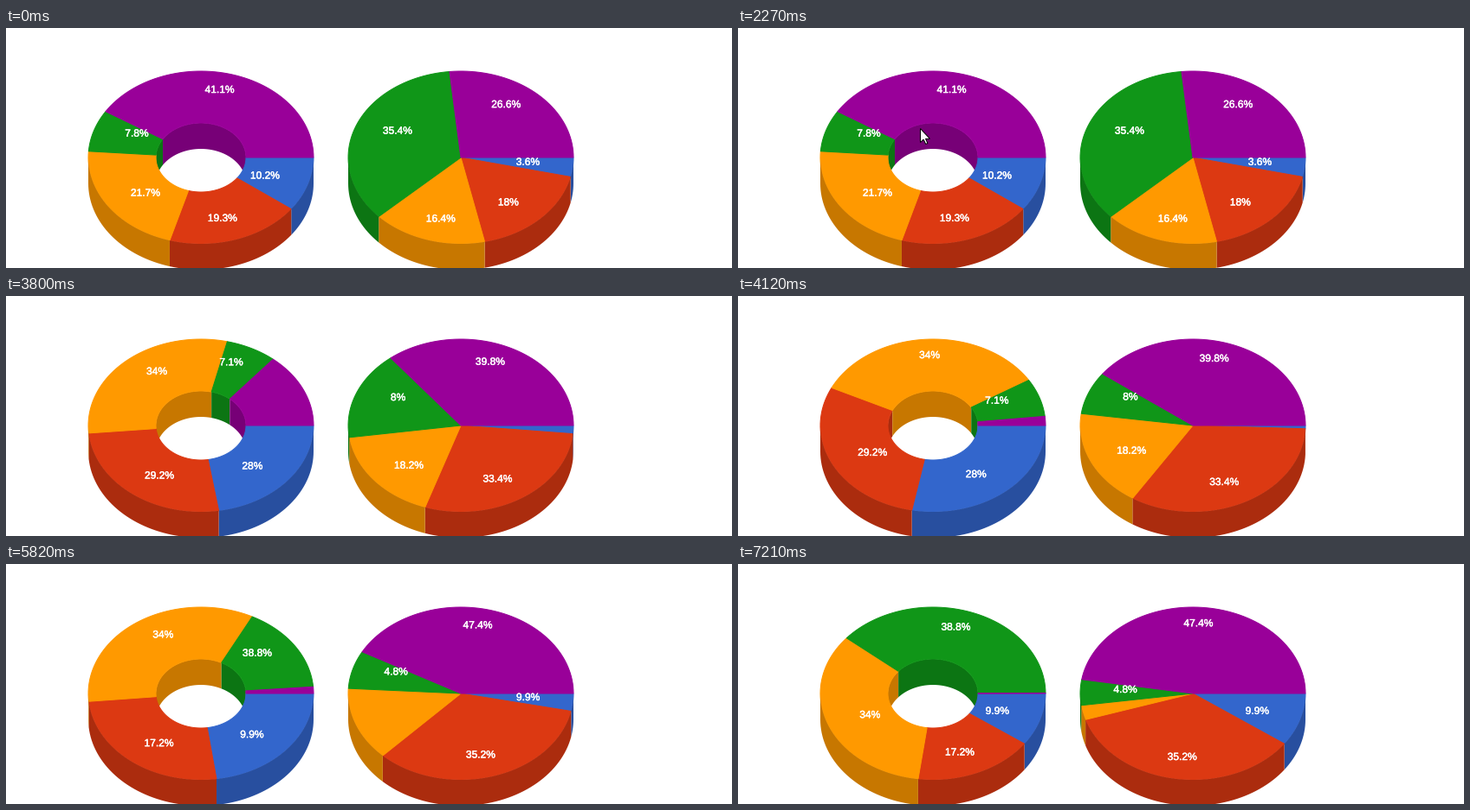
A matplotlib script that plays this animation: 838x278 px, repeating every 7600 ms.

```python
import numpy as np
import matplotlib.pyplot as plt
from matplotlib.animation import FuncAnimation
from matplotlib.colors import to_rgb
from matplotlib.patches import Polygon
import matplotlib.patheffects as pe

W, H, DPI = 838, 278, 64
LOOP, TICK = 7600, 20
PX = 72 / DPI  # points per pixel

COLORS = ["#3366CC", "#DC3912", "#FF9900", "#109618", "#990099"]
RX, RY, DEPTH, LABEL_R = 130, 100, 30, 78
MIN_LABEL = 3.18  # smallest share in percent that gets a label

DONUT = [
    [10.2, 19.3, 21.7, 7.8, 41.1],
    [28, 29.2, 34, 7.1, 1.7],
    [9.9, 17.2, 34, 38.8, 0.1],
]
PIE = [
    [3.6, 18, 16.4, 35.4, 26.6],
    [0.6, 33.4, 18.2, 8, 39.8],
    [9.9, 35.2, 2.7, 4.8, 47.4],
]


def ticks(first, last, count):
    """Redraw times of a burst of motion, on a 10 ms grid."""
    return [(first + (last - first) * k // (count - 1)) // 10 * 10
            for k in range(count)]


# (click time, redraw times) of each change of data
CHANGES = [(3370, ticks(3420, 4120, 10)), (5508, ticks(5520, 6280, 11))]
DURATION = 750

# (redraw times, waypoints, pointer stays afterwards)
MOVES = [
    (ticks(70, 790, 10),
     [(619, 224), (470, 158), (317, 115), (262, 110), (230, 118), (218, 126)],
     True),
    (ticks(1020, 1720, 10),
     [(212, 118), (190, 102), (177, 86), (196, 76), (226, 88), (240, 106)],
     True),
    (ticks(2270, 2890, 9),
     [(210, 116), (178, 148), (126, 196), (80, 238), (50, 280)],
     False),
    (ticks(6680, 7210, 8),
     [(209, 268), (350, 252), (527, 243), (690, 255), (830, 274)],
     False),
]
ARROW = np.array([(0, 0), (0, 16), (3.6, 12.6), (6.2, 18), (8.4, 17),
                  (6, 11.8), (11, 11.8)]) + 0.5


def ease(u):
    u = min(max(u, 0), 1)
    return 4 * u ** 3 if u < 0.5 else 1 - 4 * (1 - u) ** 3


def shares_at(t):
    """Index of the current data set and progress towards it."""
    for i in (1, 0):
        start, times = CHANGES[i]
        if t >= times[0]:
            now = max(x for x in times if x <= t)
            return i + 1, ease((now - start) / DURATION)
    return 0, 1


def pointer_at(t):
    for times, points, stays in reversed(MOVES):
        if t < times[0]:
            continue
        if t >= times[-1] and not stays:
            return None
        k = sum(x <= t for x in times) - 1
        u = k / (len(times) - 1)
        grid = np.linspace(0, 1, len(points))
        xs, ys = zip(*points)
        return np.interp(u, grid, xs), np.interp(u, grid, ys)
    return None


def arc(a, b, scale=1, dy=0):
    n = max(3, int(abs(b - a) * 25) + 3)
    v = np.linspace(a, b, n)
    return np.column_stack([RX * scale * np.cos(v),
                            RY * scale * np.sin(v) + dy])


def wall(a, b, scale):
    return np.vstack([arc(a, b, scale), arc(b, a, scale, DEPTH)])


class Pie3D:
    def __init__(self, ax, cx, cy, hole, data):
        self.center = np.array([cx, cy])
        self.hole = hole
        self.data = data
        dark = [tuple(0.7 ** 0.7 * v for v in to_rgb(c)) for c in COLORS]

        def layer(colors, z, **style):
            return [ax.add_patch(Polygon([(0, 0)] * 3, fc=c, zorder=z,
                                         **(style or {"lw": 0}),
                                         **({"ec": c} if style else {})))
                    for c in colors]

        self.inner = layer(dark, 1)
        self.top = layer(COLORS, 2, lw=PX, joinstyle="bevel")
        self.outer = layer(dark, 3)
        self.labels = [
            ax.text(0, 0, "", color="white", family="Liberation Sans",
                    size=12 * PX, ha="center", va="baseline", zorder=4,
                    path_effects=[pe.withStroke(linewidth=0.4 * PX,
                                                foreground="white")])
            for _ in COLORS]

    def update(self, step, p):
        new = np.array(self.data[step], float)
        old = np.array(self.data[max(step - 1, 0)], float)
        mix = old / old.sum() * (1 - p) + new / new.sum() * p
        ends = np.cumsum(mix) * 2 * np.pi
        starts = np.append(0, ends[:-1])
        for i, (a, b) in enumerate(zip(starts, ends)):
            face = [arc(a, b)]
            face.append(arc(b, a, self.hole) if self.hole else [(0, 0)])
            self.top[i].set_xy(np.vstack(face) + self.center)

            front = a < np.pi
            self.outer[i].set_visible(front)
            if front:
                self.outer[i].set_xy(wall(a, min(b, np.pi), 1) + self.center)

            back = self.hole > 0 and b > np.pi
            self.inner[i].set_visible(back)
            if back:
                self.inner[i].set_xy(
                    wall(max(a, np.pi), b, self.hole) + self.center)

            mid = (a + b) / 2
            x, y = self.center + LABEL_R * np.array([np.cos(mid), np.sin(mid)])
            self.labels[i].set_position((x, y))
            big = new[i] > MIN_LABEL
            self.labels[i].set_text(f"{new[i]:g}%" if big else "")


fig = plt.figure(figsize=(W / DPI, H / DPI), dpi=DPI, facecolor="white")
ax = fig.add_axes([0, 0, 1, 1])
ax.set(xlim=(0, W), ylim=(H, 0))
ax.axis("off")

charts = [Pie3D(ax, 225, 150, 0.4, DONUT), Pie3D(ax, 525, 150, 0, PIE)]
pointer = ax.add_patch(Polygon(ARROW, fc="white", ec="black", lw=PX,
                               joinstyle="miter", zorder=5))


def draw(i):
    t = i * TICK + TICK // 2
    for chart in charts:
        chart.update(*shares_at(t))
    tip = pointer_at(t)
    pointer.set_visible(tip is not None)
    if tip is not None:
        pointer.set_xy(ARROW + np.round(tip))
    return []


anim = FuncAnimation(fig, draw, frames=LOOP // TICK, interval=TICK,
                     repeat=True, repeat_delay=0, blit=False)
plt.show()
```
